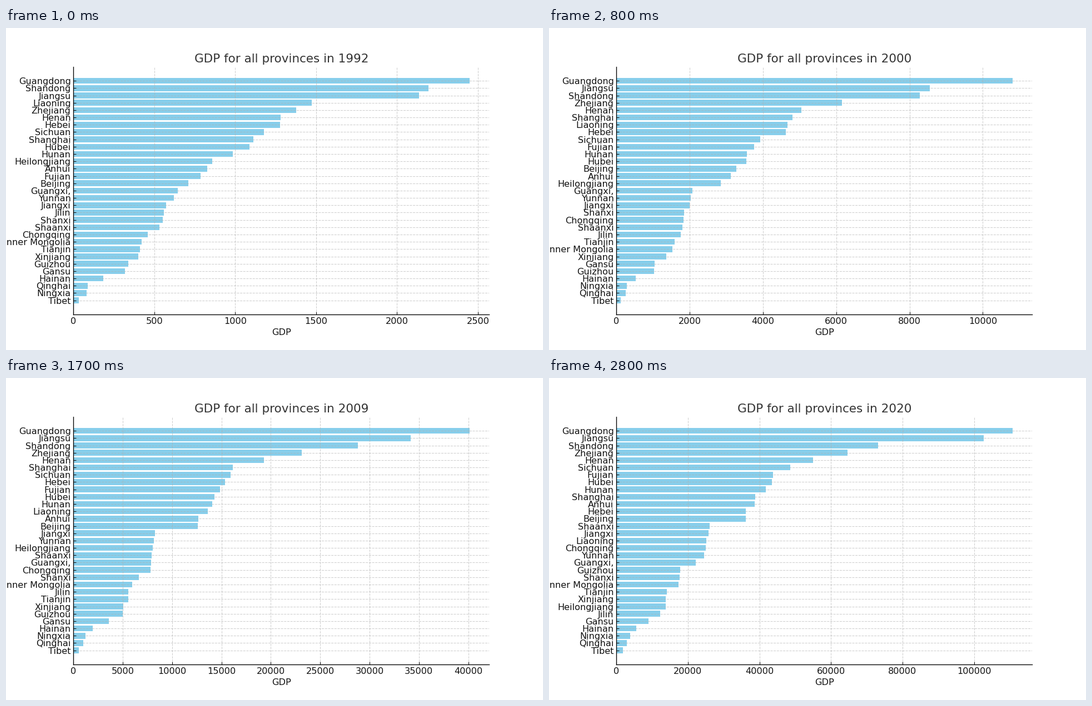
Write a matplotlib script that moves like this. It is 966 px wide and 580 px high and loops after 2.9 s.

```python
import matplotlib.pyplot as plt
import numpy as np
from matplotlib.animation import FuncAnimation

DPI = 96
WIDTH, HEIGHT = 966, 580
FIRST, TURN, LAST = 1992, 2000, 2020
INK = "#111111"

plt.rcParams.update({
    "font.family": "DejaVu Sans",
    "font.size": 12.08,
    "text.color": INK,
    "axes.labelcolor": INK,
    "axes.spines.top": False,
    "axes.spines.right": False,
    "axes.linewidth": 1.0,
    "xtick.direction": "in",
    "ytick.direction": "in",
    "xtick.color": INK,
    "ytick.color": INK,
})

# The leader grows at a steady rate between these years.
LEADER = "Guangdong"
GROWTH = {1992: 2447.5, 1995: 5940, 2000: 10810, 2003: 15980,
          2007: 31743, 2012: 57008, 2015: 74732, 2020: 110761}

# Size per thousand of the leader: at the start, the turn and the end.
SHARES = {
    "Shandong": (897, 766, 660),
    "Jiangsu": (873, 791, 927),
    "Liaoning": (602, 432, 227),
    "Zhejiang": (562, 570, 583),
    "Henan": (523, 467, 497),
    "Hebei": (522, 428, 327),
    "Sichuan": (481, 363, 439),
    "Shanghai": (455, 445, 350),
    "Hubei": (445, 328, 392),
    "Hunan": (403, 329, 377),
    "Heilongjiang": (350, 264, 124),
    "Anhui": (338, 289, 349),
    "Fujian": (321, 348, 396),
    "Beijing": (290, 303, 326),
    "Guangxi,": (264, 192, 200),
    "Yunnan": (253, 188, 221),
    "Jiangxi": (234, 185, 232),
    "Jilin": (228, 162, 111),
    "Shanxi": (225, 171, 159),
    "Shaanxi": (217, 167, 236),
    "Chongqing": (188, 169, 226),
    "Inner Mongolia": (172, 142, 157),
    "Tianjin": (168, 147, 127),
    "Xinjiang": (164, 126, 125),
    "Guizhou": (139, 95, 161),
    "Gansu": (130, 97, 81),
    "Hainan": (76, 49, 50),
    "Qinghai": (36, 24, 27),
    "Ningxia": (34, 27, 35),
    "Tibet": (14, 11, 17),
}


def leader_gdp(year):
    return np.exp(np.interp(year, list(GROWTH), np.log(list(GROWTH.values()))))


def share(year, start, turn, end):
    """Ease out towards the turn, then move evenly to the end."""
    if year < TURN:
        t = (year - FIRST) / (TURN - FIRST)
        return start + (turn - start) * t * (2 - t)
    return turn + (end - turn) * (year - TURN) / (LAST - TURN)


def ranking(year):
    top = leader_gdp(year)
    gdp = {name: top * share(year, *keys) / 1000
           for name, keys in SHARES.items()}
    gdp[LEADER] = top
    return sorted(gdp.items(), key=lambda item: item[1])


fig, ax = plt.subplots(figsize=(WIDTH / DPI, HEIGHT / DPI), dpi=DPI)
fig.subplots_adjust(left=0.1255, right=0.9, bottom=0.11, top=0.88)


def draw(i):
    year = FIRST + i
    names, values = zip(*ranking(year))
    ax.clear()
    ax.barh(names, values, color="skyblue")
    ax.set_title(f"GDP for all provinces in {year}",
                 fontsize=16.1, color="#333333")
    ax.set_xlabel("GDP")
    ax.grid(True, linestyle="--", alpha=0.6)
    return []


anim = FuncAnimation(fig, draw, frames=LAST - FIRST + 1, interval=100,
                     init_func=lambda: draw(0), repeat=True, repeat_delay=0)
plt.show()
```
